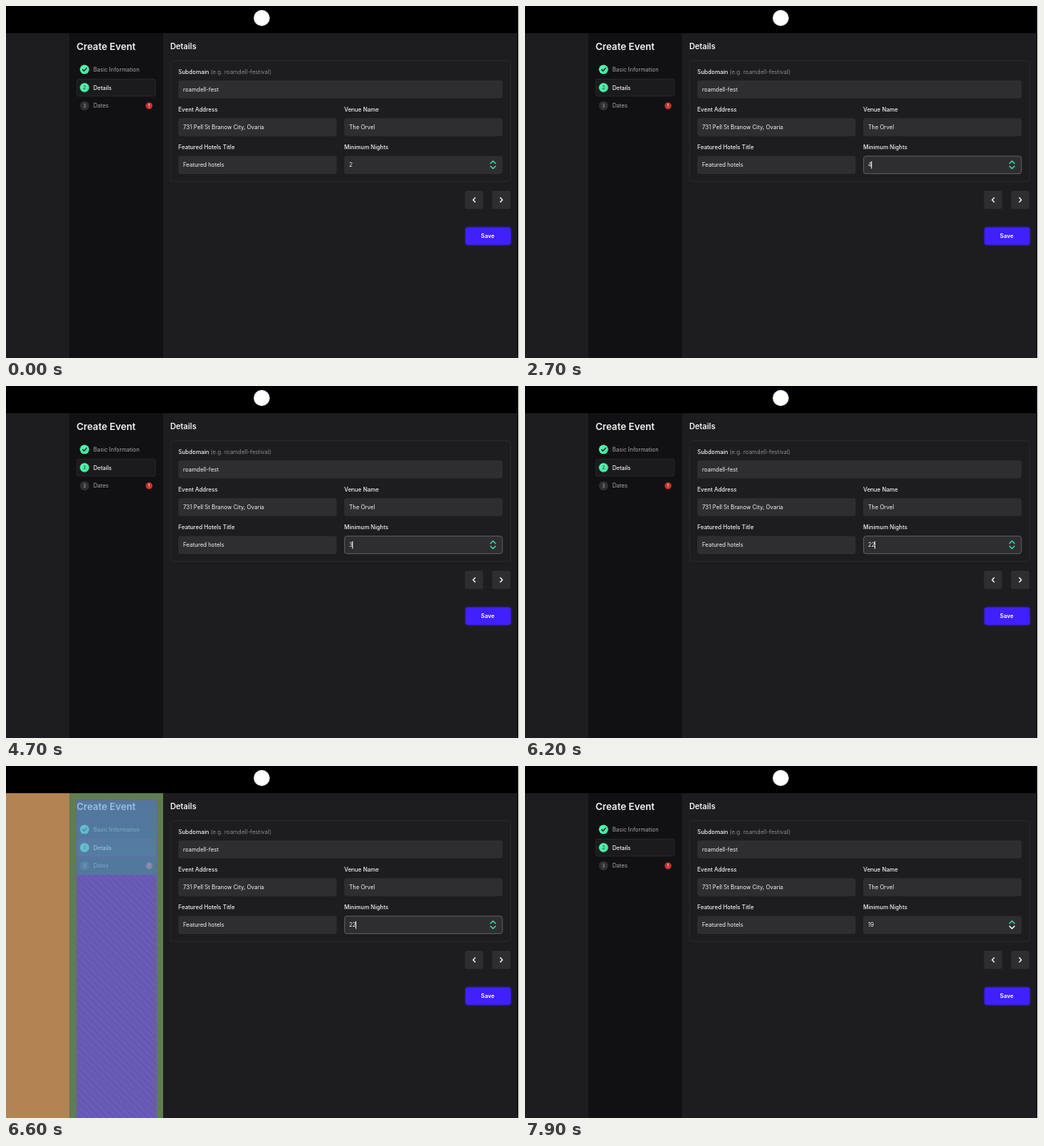
Recreate the animation shown at these times as an HTML page. Size 640 by 440 pixels, loop 8 s.

```html
<!DOCTYPE html>
<html lang="en">
<head>
<meta charset="utf-8">
<title>Create Event</title>
<style>
  html, body { margin: 0; width: 100%; height: 100%; overflow: hidden; background: #1d1d1f; }
  svg { display: block; width: 640px; height: 440px; }
  text { font: 500 7px Inter, "Open Sans", sans-serif; fill: #f4f4f5; }
  .title { font-size: 11.9px; font-weight: 600; }
  .heading { font-size: 9.8px; font-weight: 600; }
  .label { font-size: 7.1px; }
  .input { font-weight: 400; }
  .muted { fill: #8b8b8e; font-weight: 400; }
  .step { fill: #a9a9ac; font-weight: 400; }
  .badge { font-size: 5.5px; font-weight: 600; text-anchor: middle; }
  .field { fill: #2e2e30; }
  .line { fill: none; stroke-width: 1.3; stroke-linecap: round; stroke-linejoin: round; }
  .spin { stroke: #40dca3; }
  .arrow { stroke: #fff; }
  .dash { fill: none; stroke: #7757c4; stroke-width: .8; stroke-dasharray: 2 1.5; }
  .save { fill: #4020ff; filter: drop-shadow(0 0 1px #4020ff); }
  #focus { fill: #2e2e30; stroke: #5c5c5f; stroke-width: 1; }
</style>
</head>
<body>
<svg viewBox="0 0 640 440">
  <defs>
    <linearGradient id="mint" x2="1" y2="1">
      <stop stop-color="#62f7b5"/><stop offset="1" stop-color="#3ce29b"/>
    </linearGradient>
    <pattern id="hatch" width="6" height="6" patternUnits="userSpaceOnUse" patternTransform="rotate(-45)">
      <path d="M.5 0V6" stroke="#5648a2" stroke-width=".7" stroke-dasharray="2 1"/>
    </pattern>
  </defs>

  <rect width="640" height="440" fill="#1d1d1f"/>
  <rect x="79" y="34" width="117" height="406" fill="#111113"/>
  <rect width="640" height="34" fill="#000"/>
  <circle cx="319" cy="15" r="10" fill="#fff"/>

  <text class="title" x="88" y="54.7">Create Event</text>
  <rect x="88.3" y="91.3" width="98" height="21.4" rx="2.5" fill="#1b1b1d" stroke="#2b2b2d" stroke-width=".8"/>
  <circle cx="98" cy="79.3" r="5.8" fill="url(#mint)"/>
  <path class="line" d="M95.6 79.5l1.7 1.7 3.2-3.6" stroke="#142a21"/>
  <text class="step" x="109" y="81.9">Basic Information</text>
  <circle cx="98" cy="102" r="5.8" fill="url(#mint)"/>
  <text class="badge" x="98" y="104" style="fill:#1d5a42">2</text>
  <text x="109" y="104.5">Details</text>
  <circle cx="98" cy="124.7" r="5.8" fill="#303032"/>
  <text class="badge" x="98" y="126.7" style="fill:#9a9a9d">3</text>
  <text class="step" x="109" y="127.2">Dates</text>
  <circle cx="178.5" cy="124.7" r="4.2" fill="#c8352e"/>
  <text class="badge" x="178.5" y="126.8">!</text>

  <text class="heading" x="205" y="54">Details</text>
  <rect x="205.3" y="68.5" width="424.2" height="150.6" rx="4" fill="none" stroke="#29292b"/>
  <text class="label" x="215" y="85">Subdomain <tspan class="muted">(e.g. roamdell-festival)</tspan></text>
  <text class="label" x="215" y="132">Event Address</text>
  <text class="label" x="422" y="132">Venue Name</text>
  <text class="label" x="215" y="179.2">Featured Hotels Title</text>
  <text class="label" x="422" y="179.2">Minimum Nights</text>

  <g class="field">
    <rect x="215" y="93" width="404.5" height="22.5" rx="3"/>
    <rect x="215" y="140.2" width="197.5" height="22.5" rx="3"/>
    <rect x="422" y="140.2" width="197.5" height="22.5" rx="3"/>
    <rect x="215" y="187.4" width="197.5" height="22.5" rx="3"/>
    <rect x="422" y="187.4" width="197.5" height="22.5" rx="3"/>
    <rect x="572.5" y="231" width="22.8" height="22.8" rx="2.5"/>
    <rect x="606.5" y="231" width="22.8" height="22.8" rx="2.5"/>
  </g>
  <rect id="focus" x="422.4" y="187.7" width="196.8" height="21.9" rx="3"/>
  <text class="input" x="221" y="106.9">roamdell-fest</text>
  <text class="input" x="221" y="154.1">731 Pell St Branow City, Ovaria</text>
  <text class="input" x="428" y="154.1">The Orvel</text>
  <text class="input" x="221" y="201.2">Featured hotels</text>
  <text class="input" x="428" y="201.2" id="nights">2</text>
  <rect id="caret" y="194" width=".9" height="9.5" fill="#fff"/>
  <path class="line spin" d="M604.5 196.8l3.1-3 3.1 3"/>
  <path class="line spin" id="down" d="M604.5 200.2l3.1 3 3.1-3"/>

  <path class="line arrow" d="M585.2 239.8l-2.5 2.6 2.5 2.6"/>
  <path class="line arrow" d="M616.8 239.8l2.5 2.6-2.5 2.6"/>
  <rect class="save" x="573.3" y="276.8" width="56.4" height="21.8" rx="3"/>
  <text x="601" y="290.1" text-anchor="middle" style="font-weight:700">Save</text>

  <g id="inspector">
    <rect y="34" width="79" height="406" fill="#f6b26b" fill-opacity=".69"/>
    <path d="M79 34h117v406H79zM88 43v397h100V43z" fill-rule="evenodd" fill="#93c47d" fill-opacity=".6"/>
    <rect x="88" y="43" width="100" height="93" fill="#6fa8dc" fill-opacity=".69"/>
    <rect x="88" y="136" width="100" height="304" fill="#695cb4"/>
    <rect x="88" y="136" width="100" height="304" fill="url(#hatch)"/>
    <path class="dash" d="M88.4 440V43.4H187.6V440M88 68.5h100M88 91h100M88 113.5h100M88 136h100"/>
  </g>

  <rect x="638" width="1" height="440" fill="#000"/>
  <rect x="639" width="1" height="440" fill="#ddd"/>
</svg>
<script>
  const LOOP = 8000;
  const INSPECT = { from: 6500, to: 6700 };
  // The field has focus while typing; stepping with the lower arrow takes it away.
  const states = [
    { at: 0, value: "2" },
    { at: 700, value: "2", focused: true },
    { at: 1900, value: "3", focused: true },
    { at: 2400, value: "4", focused: true },
    { at: 4500, value: "3", focused: true },
    { at: 5400, value: "2", focused: true },
    { at: 5800, value: "22", focused: true },
    { at: 7000, value: "21", stepping: true },
    { at: 7600, value: "20", stepping: true },
    { at: 7800, value: "19", stepping: true }
  ];
  const [nights, focus, caret, down, inspector] =
    ["nights", "focus", "caret", "down", "inspector"].map(id => document.getElementById(id));
  const show = (node, visible) => node.style.display = visible ? "" : "none";

  function draw(now) {
    const time = now % LOOP;
    const { value, focused, stepping } = states.findLast(state => state.at <= time);
    nights.textContent = value;
    caret.setAttribute("x", 427.6 + value.length * 4.2);
    show(focus, focused);
    show(caret, focused);
    show(inspector, time >= INSPECT.from && time < INSPECT.to);
    down.style.stroke = stepping ? "#fff" : "";
    requestAnimationFrame(draw);
  }
  draw(0);
</script>
</body>
</html>
```
